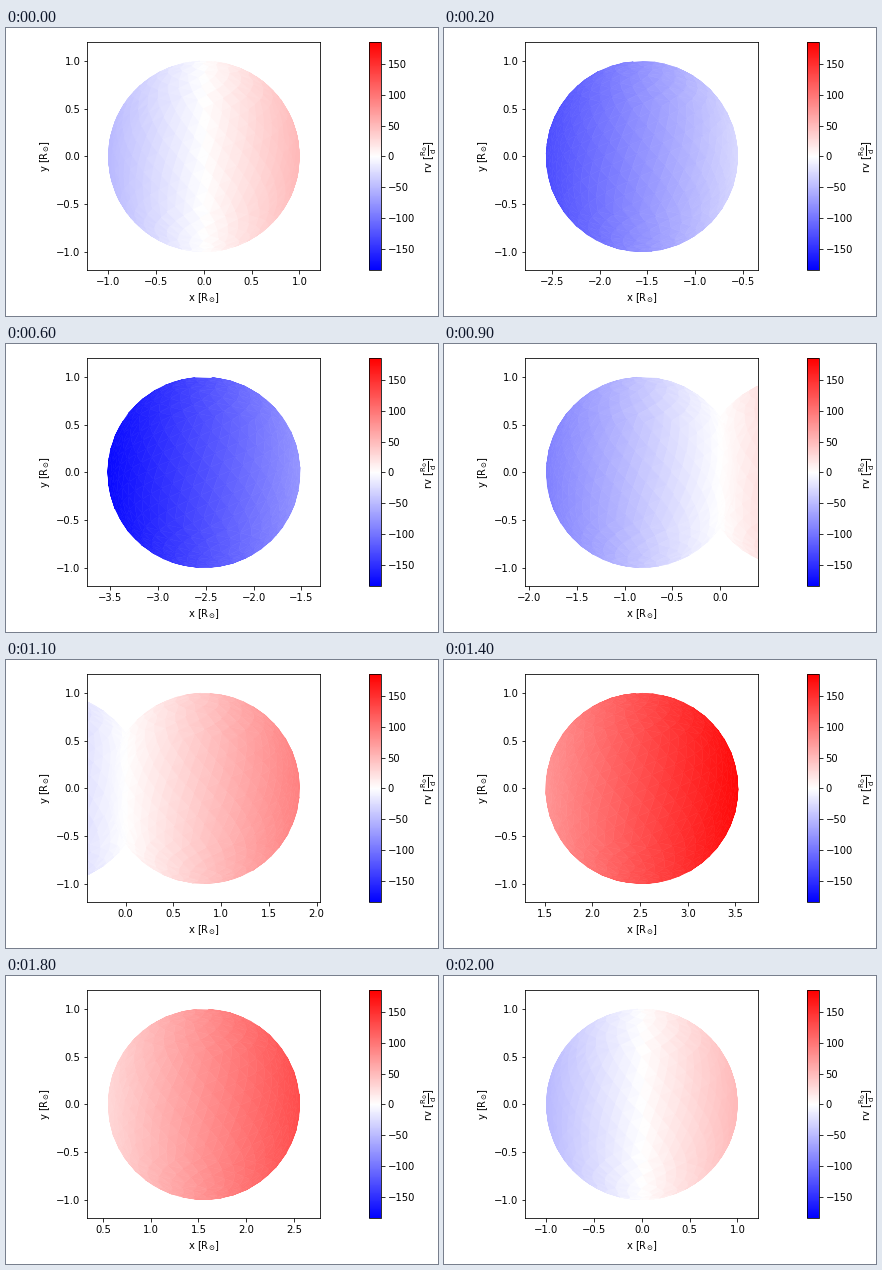
These frames come from a looping animation (432 px wide and 288 px high, 2.1 s). A matplotlib script:

```python
import numpy as np
import matplotlib.pyplot as plt
from matplotlib.animation import FuncAnimation
from matplotlib.cm import ScalarMappable
from matplotlib.collections import PolyCollection
from matplotlib.colors import Normalize
from matplotlib.ticker import MultipleLocator
from matplotlib.tri import Triangulation

W, H, DPI = 432, 288, 72
FRAMES = 21
ORBIT = 2.65             # distance of each star from the barycentre
RV_SCALE = 50.6          # radial velocity per unit of x
RV_MAX = 184.8
HALF_X, HALF_Y = 1.2205, 1.193
RADII = np.array([1.008, 1.001, 0.997])

plt.rcParams.update({"font.family": "DejaVu Sans", "font.size": 10})


def star_mesh(n=752):
    """Near-uniform triangles on a slightly stretched sphere."""
    i = np.arange(n) + 0.5
    z = 1 - 2 * i / n
    lon = np.pi * (1 + 5 ** 0.5) * i
    r = np.sqrt(1 - z ** 2)
    pts = np.column_stack([r * np.cos(lon), r * np.sin(lon), z])
    plane = pts[:, :2] / (1 - z)[:, None]
    faces = Triangulation(plane[:, 0], plane[:, 1]).triangles
    return (pts * RADII)[faces]


MESH = star_mesh()


def project(phi):
    """Visible triangles of the star at orbital angle phi, with its depth."""
    s, c = np.sin(phi), np.cos(phi)
    u, v, w = np.moveaxis(MESH, -1, 0)
    local = np.stack([-u * s - v * c, w, -u * c + v * s], axis=-1)
    normal = np.cross(local[:, 1] - local[:, 0], local[:, 2] - local[:, 0])
    outward = np.sign(np.sum(normal * local.mean(axis=1), axis=1))
    front = local[normal[:, 2] * outward > 0][:, :, :2]
    return -ORBIT * c, front + [-ORBIT * s, 0]


def add_axes(left, right, top=14.4, bottom=242.4):
    return fig.add_axes([left / W, 1 - bottom / H,
                         (right - left) / W, (bottom - top) / H])


fig = plt.figure(figsize=(W / DPI, H / DPI), dpi=DPI, facecolor="white")
norm = Normalize(-RV_MAX, RV_MAX)

ax = add_axes(81.4, 314.4)
ax.set_ylim(-HALF_Y, HALF_Y)
ax.xaxis.set_major_locator(MultipleLocator(0.5))
ax.yaxis.set_major_locator(MultipleLocator(0.5))
ax.set_xlabel(r"x [$\mathrm{R_{\odot}}$]")
ax.set_ylabel(r"y [$\mathrm{R_{\odot}}$]")

cax = add_axes(363.2, 374.6)
bar = fig.colorbar(ScalarMappable(norm, "bwr"), cax=cax)
bar.set_ticks(np.arange(-150, 151, 50))
bar.set_label(r"rv [$\mathrm{\frac{R_{\odot}}{d}}$]")

stars = PolyCollection([], cmap="bwr", norm=norm,
                       edgecolors="face", linewidths=0.6)
ax.add_collection(stars, autolim=False)


def update(k):
    phi = 2 * np.pi * k / (FRAMES - 1)
    pair = sorted([project(phi), project(phi + np.pi)], key=lambda p: p[0])
    tris = np.concatenate([t for _, t in pair])
    stars.set_verts(tris)
    stars.set_array(RV_SCALE * tris[:, :, 0].mean(axis=1))
    center = -ORBIT * np.sin(phi)
    ax.set_xlim(center - HALF_X, center + HALF_X)
    return [stars]


anim = FuncAnimation(fig, update, frames=FRAMES, interval=100,
                     repeat=True, repeat_delay=0, blit=False)
plt.show()
```
